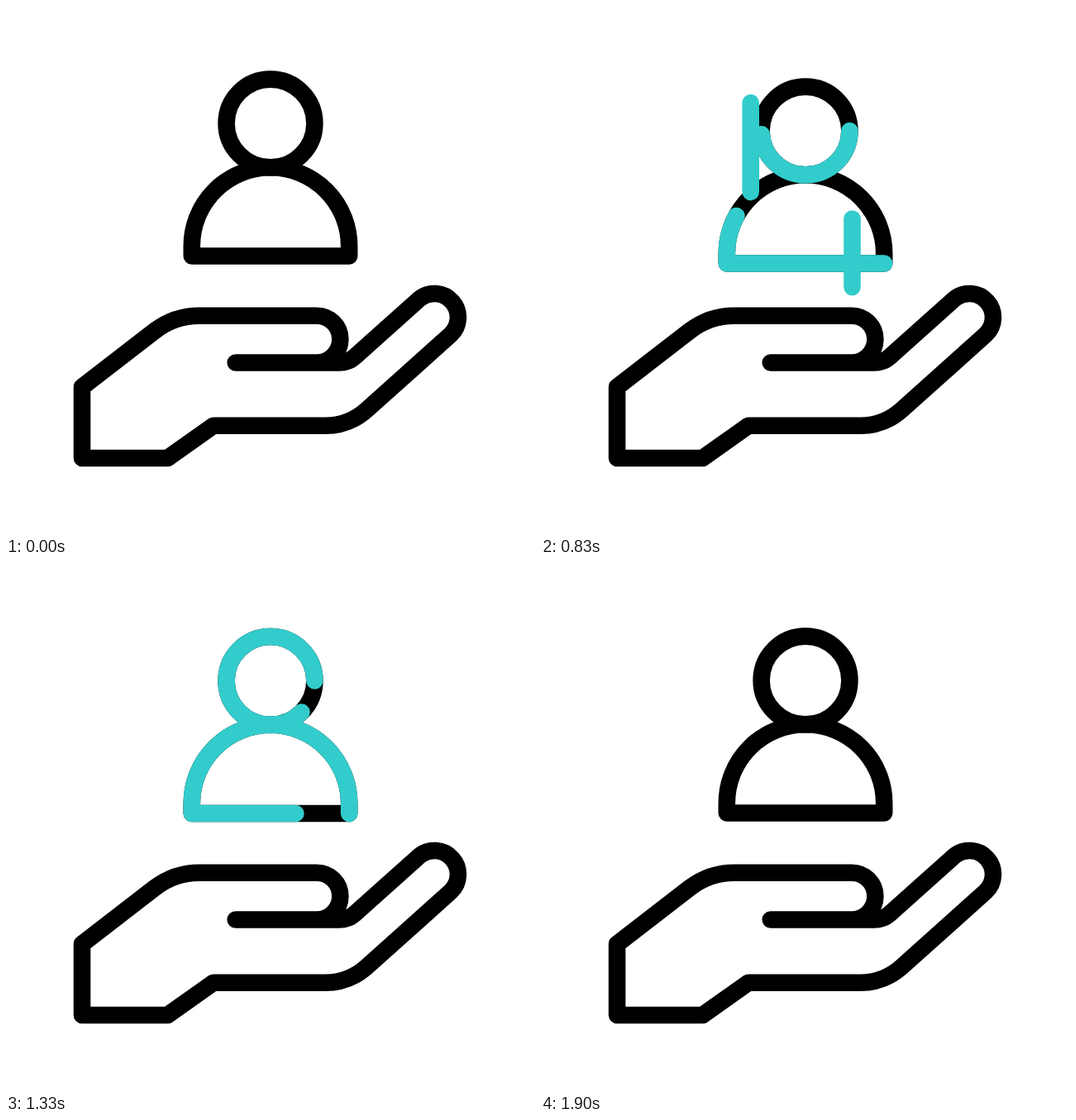
Animation of 640 by 640 pixels, one loop 2500 ms. Source, as an HTML page:

```html
<!DOCTYPE html>
<html lang="en">
<head>
<meta charset="utf-8">
<title>Hand and person</title>
<style>
  html, body { margin: 0; width: 100%; height: 100%; overflow: hidden; background: #fff; }
  svg { display: block; width: 100%; height: 100%; }
  path, circle { fill: none; stroke: #000; stroke-width: 20.6; stroke-linecap: round; stroke-linejoin: round; }
  .teal { stroke: #3cc; }
</style>
</head>
<body>
<svg viewBox="0 0 640 640">
  <path d="M277.7 431.5H403Q414 431.5 421.5 424.8L499.9 354.6A28.7 28.7 0 0 1 538.1 397.4L436 488.8A75 75 0 0 1 386 507.7H251L195.5 547H92V461L180 393A88 88 0 0 1 234 374.7H376A28.4 28.4 0 0 1 376 431.5"/>
  <g id="person">
    <circle cx="320" cy="142" r="53.4"/>
    <path d="M415.2 302.5H224.8V290.5A95.2 95.2 0 0 1 415.2 290.5Z"/>
    <circle id="head" class="teal" cx="320" cy="142" r="53.4" pathLength="1"/>
    <path id="body" class="teal" d="M415.2 302.5H224.8V290.5A95.2 95.2 0 0 1 415.2 290.5V302.5" pathLength="1"/>
  </g>
  <path id="left" class="teal" d="M253.7 332.7V117" pathLength="1"/>
  <path id="right" class="teal" d="M376.5 340V222" pathLength="1"/>
</svg>
<script>
const LOOP = 2500, FPS = 30, DROP = 28.5;
const $ = id => document.getElementById(id);
const [person, head, body, left, right] = ['person', 'head', 'body', 'left', 'right'].map($);

// Eased progress from 0 to 1 between steps a and b
function ease(n, a, b) {
  const u = Math.min(1, Math.max(0, (n - a) / (b - a)));
  return u * u * (3 - 2 * u);
}

// Show only the part of a path between start and end (0 to 1)
function trim(el, start, end) {
  const len = end - start;
  el.style.display = len > 0.0001 ? '' : 'none';
  el.style.strokeDasharray = `${len} 3`;
  el.style.strokeDashoffset = -start;
}

function draw(ms) {
  const n = Math.floor((ms % LOOP) * FPS / 1000 + 0.12);

  const drop = ease(n, 22, 30) - ease(n, 30, 40.8) + ease(n, 40.8, 49) - ease(n, 49, 57);
  person.setAttribute('transform', `translate(0 ${drop * DROP})`);

  for (const el of [head, body]) trim(el, ease(n, 36.4, 52.6), ease(n, 19.3, 30.9));
  trim(left, ease(n, 20, 30), ease(n, 13, 24));
  trim(right, ease(n, 25, 35), ease(n, 18, 29));
}

const t0 = performance.now();
function tick() {
  draw(performance.now() - t0);
  requestAnimationFrame(tick);
}
tick();
</script>
</body>
</html>
```
